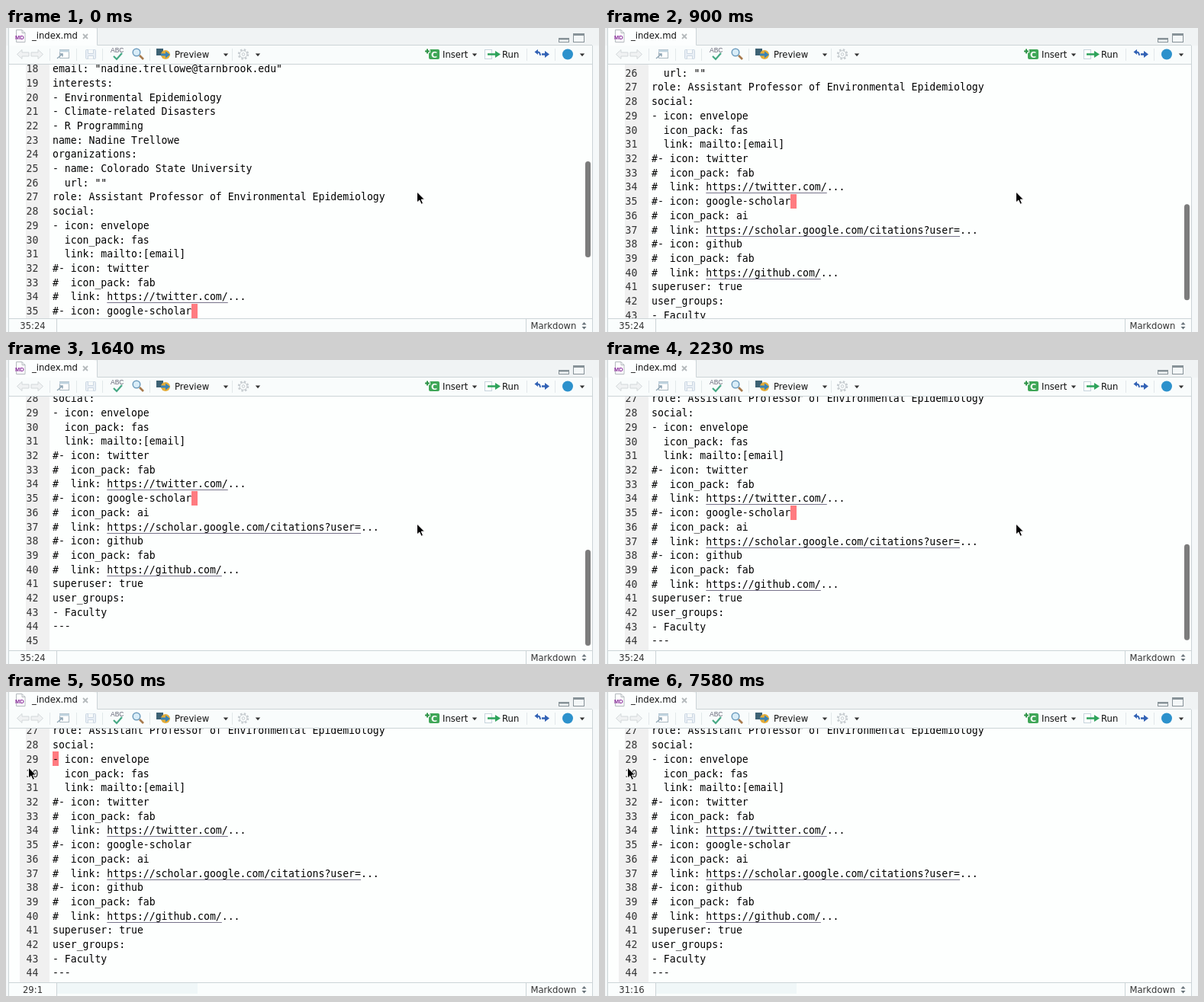
These frames come from a looping animation (777x399 px, 8 s). An HTML page:

```html
<!DOCTYPE html>
<html lang="en">
<head>
<meta charset="utf-8">
<title>Editor</title>
<style>
  html, body { margin: 0; width: 100%; height: 100%; overflow: hidden; background: #fff; }
  svg { display: block; width: 777px; height: 399px; }
  text { white-space: pre; fill: #111; }
  .ui { font: 11.6px "DejaVu Sans", "Open Sans", sans-serif; }
  .code { font: 13.16px "DejaVu Sans Mono", "Noto Sans Mono", monospace; fill: #000; }
  .num { fill: #333; }
  .tiny { font: 7.5px "Liberation Sans", Arial, sans-serif; }
  .rule { stroke: #ccd4d7; fill: none; }
</style>
</head>
<body>
<svg viewBox="0 0 777 399">
  <defs>
    <clipPath id="pane"><rect x="4" y="48" width="764" height="333"/></clipPath>
    <path id="drop" d="M-3.2-1.6H3.2L0 2.2Z" fill="#333"/>
  </defs>

  <rect width="777" height="399" fill="#f5f8f9"/>
  <rect x="4" y="48" width="764" height="333" fill="#fdfffe"/>

  <g clip-path="url(#pane)">
    <rect x="26" y="48" width="31" height="333" fill="#f0f0f0"/>
    <rect id="gutter" x="18" y="76" width="39" height="305" fill="#f0f0f0"/>
    <g id="doc">
      <rect id="caret" width="8" fill="#ff7b80"/>
      <g id="lines"></g>
    </g>
    <rect id="thumb" x="759" width="7" height="126" rx="3.5" fill="#7c7c7c"/>
  </g>

  <!-- tab strip -->
  <rect width="777" height="23" fill="#f0f3f4"/>
  <path d="M4 23V0H114Q120 0 120 6V23Z" fill="#fcfefe"/>
  <path class="rule" d="M119.5 0V22.5H768M3.5 0V399M768.5 23V399"/>
  <path d="M13.5 2.5H21L25 6.5V18.5H13.5ZM21 2.5V6.5H25" fill="#fff" stroke="#b3b9bd"/>
  <text class="tiny" x="12" y="15" style="fill:#8a2c9c;font-weight:bold">MD</text>
  <text class="ui" x="34" y="14">_index.md</text>
  <path d="M101 8L107 14M107 8L101 14" stroke="#b4b9bc" stroke-width="1.8"/>
  <g fill="#f4f7f8" stroke="#879298">
    <rect x="724.5" y="13.5" width="13" height="5"/>
    <rect x="743.5" y="7.5" width="14" height="11"/>
    <path d="M724 14.5H738M743 9H758" stroke-width="2"/>
  </g>

  <!-- toolbar -->
  <rect x="4" y="23" width="764" height="24" fill="#f9fcfc"/>
  <path class="rule" d="M4 47.5H768"/>
  <path class="rule" d="M57.5 27V43M92.5 27V43M126.5 27V43M188.5 27V43M296.5 27V43M682.5 27V43M719.5 27V43" stroke-opacity=".5"/>
  <g fill="#f0f2f3" stroke="#d3d8da">
    <path d="M14.5 34.5L21 28.5V32H30V37H21V40.5Z"/>
    <path d="M48.5 34.5L42 28.5V32H33V37H42V40.5Z"/>
  </g>
  <g fill="#fff" stroke="#aab8c0">
    <rect x="70.5" y="28.5" width="12" height="11"/>
    <path d="M70 30H83" stroke="#c0d3df" stroke-width="3"/>
    <path d="M67 40L74 34M70.5 34H74V37.5" fill="none" stroke="#8fa5b4" stroke-width="1.5"/>
  </g>
  <g fill="#e8eef5" stroke="#cdd8e3">
    <rect x="104.5" y="28.5" width="13" height="12" rx="1"/>
    <path d="M107.5 28.5V33.5H114.5V28.5M107.5 40.5V36.5H114.5V40.5" fill="#f8fafb"/>
  </g>
  <text class="tiny" x="137" y="32" style="font-size:8.5px;fill:#667">ABC</text>
  <path d="M141 37L145 41L152 33" fill="none" stroke="#45a884" stroke-width="2.2"/>
  <path d="M175 36L180 41" stroke="#a77a4d" stroke-width="2.6"/>
  <circle cx="171" cy="32" r="4.8" fill="#d9edf8" stroke="#6f9dbe" stroke-width="1.5"/>
  <rect x="197" y="27" width="9" height="9" fill="#3d6274"/>
  <circle cx="209" cy="35" r="6" fill="#e5ad38"/>
  <path d="M203 33.5H209V30.5L215 35L209 39.5V36.5H203Z" fill="#3b83b4"/>
  <text class="ui" x="221" y="39">Preview</text>
  <use href="#drop" x="288" y="35"/>
  <g fill="none" stroke="#c6ccd0">
    <circle cx="311" cy="34.5" r="6" stroke-width="2.5" stroke-dasharray="2.4 2.312"/>
    <circle cx="311" cy="34.5" r="4.8"/>
    <circle cx="311" cy="34.5" r="1.8"/>
  </g>
  <use href="#drop" x="330" y="35"/>
  <rect x="554" y="28" width="14" height="13" rx="2" fill="#3fa657"/>
  <text class="ui" x="557" y="39" style="fill:#fff;font-weight:bold;font-size:11px">C</text>
  <path d="M548 30.5H556M552 26.5V34.5" stroke="#fff" stroke-width="4"/>
  <path d="M549 30.5H555M552 27.5V33.5" stroke="#2f9449" stroke-width="2"/>
  <text class="ui" x="572" y="39">Insert</text>
  <use href="#drop" x="614" y="35"/>
  <rect x="627.5" y="28.5" width="9" height="12" fill="#fff" stroke="#c6d4dc"/>
  <path d="M631 33.2H641V30L648 34.5L641 39V35.8H631Z" fill="#2ea35b"/>
  <text class="ui" x="650" y="39">Run</text>
  <g fill="#3262b5">
    <path d="M700 36Q700 31.5 696 31.5" fill="none" stroke="#3262b5" stroke-width="1.8"/>
    <path d="M697 28L692.5 31.5L697 35Z"/>
    <path d="M702 33.2H706V30L712 34.5L706 39V35.8H702Z"/>
  </g>
  <circle cx="736" cy="34.5" r="7" fill="#2c91cc"/>
  <use href="#drop" x="755" y="35"/>

  <!-- status bar -->
  <rect x="4" y="381" width="764" height="18" fill="#fafdfd"/>
  <rect id="tint" x="67" y="382" width="184" height="14" fill="#f0f7f8"/>
  <path class="rule" d="M4 381.5H768M66.5 382V399M681.5 382V399"/>
  <text class="ui" id="pos" x="35" y="395" text-anchor="middle" style="fill:#333"></text>
  <text class="ui" x="687.5" y="395" style="fill:#333">Markdown</text>
  <path d="M754.5 389.5L757.5 386L760.5 389.5ZM754.5 392L757.5 395.5L760.5 392Z" fill="#68737a"/>

  <path id="arrow" d="M0 0V14L3.3 11L5.6 16.3L8 15.2L5.7 10.1H10Z" fill="#000" stroke="#fff"/>
  <path id="beam" d="M-3-8Q0-8 0-6Q0-8 3-8M0-6.5V6.5M-3 8Q0 8 0 6Q0 8 3 8M-1.5 3H1.5" fill="none" stroke="#111" stroke-width="1.3"/>
</svg>
<script>
const LOOP = 8000, FIRST = 18, PITCH = 18.7, CHAR = 7.923, LEFT = 61, TOP = 43.6;
const source = `email: "nadine.trellowe@tarnbrook.edu"
interests:
- Environmental Epidemiology
- Climate-related Disasters
- R Programming
name: Nadine Trellowe
organizations:
- name: Colorado State University
  url: ""
role: Assistant Professor of Environmental Epidemiology
social:
- icon: envelope
  icon_pack: fas
  link: mailto:[email]
#- icon: twitter
#  icon_pack: fab
#  link: https://twitter.com/...
#- icon: google-scholar
#  icon_pack: ai
#  link: https://scholar.google.com/citations?user=...
#- icon: github
#  icon_pack: fab
#  link: https://github.com/...
superuser: true
user_groups:
- Faculty
---

Research on climate and health`.split("\n");

const $ = id => document.getElementById(id);
const set = (id, attrs) => { for (const k in attrs) $(id).setAttribute(k, attrs[k]); };
const show = (id, on) => set(id, { visibility: on ? "visible" : "hidden" });
const lerp = (a, b, p) => a + (b - a) * p;
const smooth = p => p * p * (3 - 2 * p);
const smoother = p => p * p * p * (p * (6 * p - 15) + 10);

// Progress in n held steps, the first at t0 and the last at t1.
function steps(t, t0, t1, n) {
  if (t < t0) return 0;
  if (t >= t1) return 1;
  return (Math.floor((t - t0) * (n - 1) / (t1 - t0)) + 1) / n;
}

const lineTop = n => TOP + (n - FIRST) * PITCH;

$("lines").innerHTML = source.map((line, i) => {
  const n = FIRST + i, y = Math.round(lineTop(n) + 14.6);
  const link = line.match(/https.*?(?=\.\.\.)/);
  const mark = link ? `<rect x="${LEFT + link.index * CHAR}" y="${y + 3}" width="${link[0].length * CHAR}" height="1" fill="#77738a"/>` : "";
  return `<text class="code num" x="26.5" y="${y}">${n}</text><text class="code" x="${LEFT}" y="${y}">${line}</text>${mark}`;
}).join("");

// Caret states: start, line, column, visible height in lines.
const carets = [
  [0, 35, 24, 1], [3860, 29, 1, 1], [4460, 29, 1, 0], [5050, 29, 1, 1],
  [5350, 30, 1, 1], [5650, 31, 1, 1], [6240, 31, 1, 0], [6540, 31, 1, 0.5],
  [6980, 31, 16, 1], [7580, 31, 16, 0]
];

function draw(t) {
  const scroll = 144 * smooth(steps(t, 150, 900, 6))
    + 46 * smooth(steps(t, 1190, 1640, 4))
    - 19 * smooth(steps(t, 1940, 2230, 3));
  set("doc", { transform: `translate(0 ${-Math.round(scroll)})` });
  set("thumb", { y: 175 + scroll * 0.39, opacity: 1 - steps(t, 2530, 2830, 3) });

  const [, line, col, part] = carets.filter(c => c[0] <= t).pop();
  const height = Math.round(19 * part);
  set("caret", {
    x: Math.round(LEFT + (col - 1) * CHAR),
    y: Math.round(lineTop(line)) + 19 - height,
    height
  });
  $("pos").textContent = line + ":" + col;
  show("gutter", t >= 3860);
  show("tint", t >= 3860);

  const reach = smoother(steps(t, 2530, 3710, 9));
  const leave = smooth(steps(t, 4750, 5050, 3));
  const inText = t >= 2530 && t < 4750;
  show("beam", inText);
  show("arrow", !inText);
  set("beam", { transform: `translate(${lerp(542, 61, reach)} ${lerp(222, 85, reach)})` });
  const tip = leave ? [lerp(61, 29.5, leave), lerp(85, 99, leave)] : [538.5, 215];
  set("arrow", { transform: `translate(${tip})` });
}

function tick() {
  draw(performance.now() % LOOP);
  requestAnimationFrame(tick);
}
tick();
</script>
</body>
</html>
```
